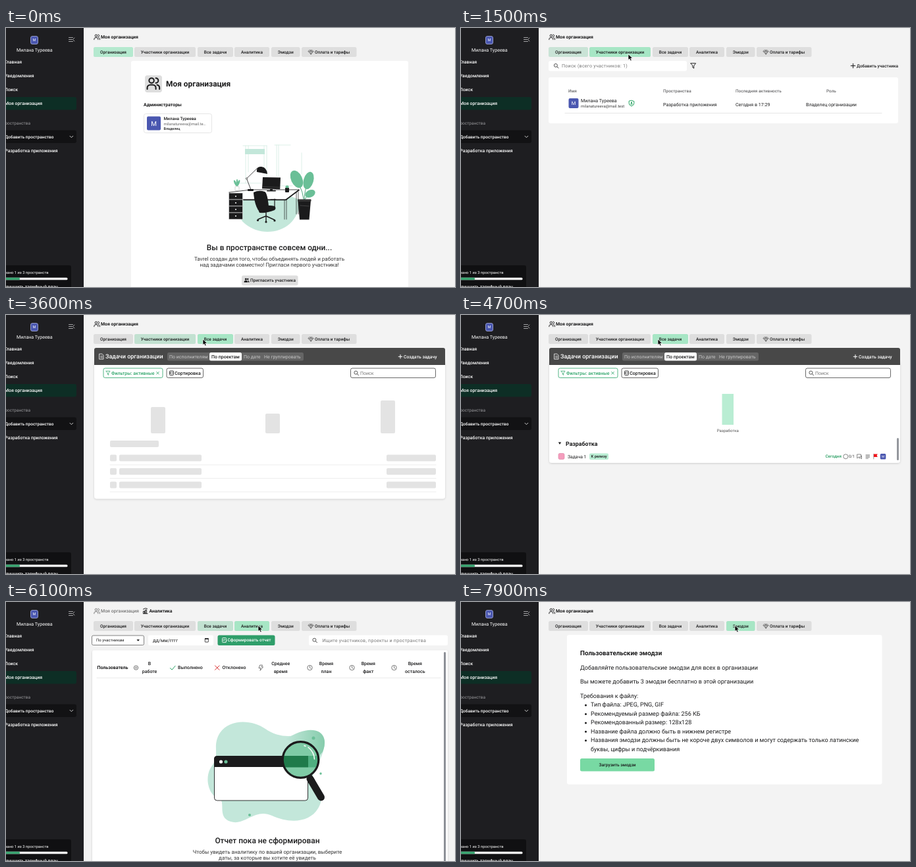
These frames come from a looping animation (682 by 394 pixels, 8 s). An HTML page:

```html
<!DOCTYPE html>
<html lang="ru">
<head>
<meta charset="utf-8">
<title>Моя организация</title>
<style>
  html, body { margin: 0; width: 100%; height: 100%; overflow: hidden; background: #f3f3f3; }
  svg { display: block; width: 682px; height: 394px; font-family: Roboto, Arial, sans-serif; }
  text { text-rendering: geometricPrecision; }
</style>
</head>
<body>
<svg id="stage" viewBox="0 0 682 394"></svg>
<script>
const LOOP = 8000, STEP = 100;
const INK = '#1b1b1c', MINT = '#b5e9cf', PALE = '#c3e7da', LEAF = '#6abf97', BLUE = '#4a57b0';
const USER = 'Милана Туреева', MAIL = 'milanatureeva@mail.te';

// Drawing helpers: each returns SVG markup
const rect = (x, y, w, h, fill, r = 0, extra = '') =>
  `<rect x="${x}" y="${y}" width="${w}" height="${h}" rx="${r}" fill="${fill}" ${extra}/>`;
const box = (x, y, w, h, fill, r, line, lw = .8) =>
  rect(x, y, w, h, fill, r, `stroke="${line}" stroke-width="${lw}"`);
const path = (d, line = INK, lw = .9, fill = 'none') =>
  `<path d="${d}" stroke="${line}" stroke-width="${lw}" fill="${fill}" stroke-linecap="round" stroke-linejoin="round"/>`;
const shape = (d, fill) => `<path d="${d}" fill="${fill}"/>`;
const dot = (x, y, r, fill, line = 'none', lw = .8) =>
  `<circle cx="${x}" cy="${y}" r="${r}" fill="${fill}" stroke="${line}" stroke-width="${lw}"/>`;
const oval = (x, y, rx, ry, a, fill) =>
  `<ellipse rx="${rx}" ry="${ry}" fill="${fill}" transform="translate(${x} ${y}) rotate(${a})"/>`;
// y is the vertical middle of the capital letters
const text = (x, y, s, size, weight = 400, fill = INK, anchor = 'start', gap = 0) =>
  `<text x="${x}" y="${y + size * .355}" font-size="${size}" font-weight="${weight}" fill="${fill}" text-anchor="${anchor}" letter-spacing="${gap}">${s}</text>`;
const mid = (x, y, s, size, weight, fill) => text(x, y, s, size, weight, fill, 'middle');
const end = (x, y, s, size, weight, fill) => text(x, y, s, size, weight, fill, 'end');
const group = (id, body, extra = '') => `<g id="${id}" ${extra}>${body}</g>`;
const place = (x, y, k, body) => `<g transform="translate(${x} ${y}) scale(${k})">${body}</g>`;

// Icons
const people = (x, y, k, color = INK) => place(x, y, k,
  path('M13 7a4 4 0 1 1-8 0a4 4 0 1 1 8 0M2 21v-2a5 5 0 0 1 5-5h4a5 5 0 0 1 5 5v2M16 3a4 4 0 0 1 0 8M22 21v-2a5 5 0 0 0-4-5', color, 2.2));
const lens = (x, y, color = '#444') =>
  dot(x - .6, y - .6, 2.5, 'none', color, .9) + path(`M${x + 1.3} ${y + 1.3}l2.2 2.2`, color, 1);
const funnel = (x, y, k, color) => place(x, y, k, path('M-4-4h8l-3 4v4l-2-1.4V0z', color, 1));
const plus = (x, y, r, color) => path(`M${x - r} ${y}h${2 * r}M${x} ${y - r}v${2 * r}`, color, 1);
const clock = x => dot(x, 100, 3.7, 'none', '#444', .7) + path(`M${x} 97.7v2.4l1.6 1`, '#444', .7);
const avatar = (x, y, s, size, r = 2) => rect(x, y, s, s, BLUE, r) + mid(x + s / 2, y + s / 2, 'М', size, 400, '#fff');
const sheet = (x, y, color) =>
  path(`M${x - 3} ${y - 4}h4l2 2v6h-6zM${x - 1.4} ${y - .5}h2.8M${x - 1.4} ${y + 1.7}h2.8`, color, .8);

const tabs = [
  ['Организация', 133, 60], ['Участники организации', 195, 93], ['Все задачи', 291, 54],
  ['Аналитика', 347, 53], ['Эмодзи', 403, 43.5], ['Оплата и тарифы', 449, 83.5]
];

function sidebar() {
  const item = (x, y, s, size = 6.9) => end(x, y, s, size, 500, '#fff');
  return rect(0, 0, 118, 394, '#1e1e21') +
    box(37.5, 12.5, 11, 12, BLUE, 2.5, '#aab0dd', .8) + mid(43, 18.5, 'М', 5.5, 400, '#fff') +
    path('M95.5 14.5h6M95.5 17.5h5M95.5 20.5h6M104 15l-2.4 2.5l2.4 2.5', '#c4c4c6', .8) +
    mid(43.3, 33.3, USER, 7.1, 400, '#fff') +
    item(24, 51.8, 'Главная') + item(42.5, 72.8, 'Уведомления') + item(18, 93.8, 'Поиск') +
    rect(-5, 105, 112, 19.5, '#0d2e25', 3) + item(55, 114.5, 'Моя организация') +
    end(37, 144.8, 'Пространства', 6.5, 400, '#98989b') +
    rect(-5, 155.5, 112, 19.5, '#121214', 3) + item(72.5, 165.3, 'Добавить пространство', 6.5) +
    path('M97 164.3l2.4 2.4l2.4-2.4', '#ddd', .9) +
    item(78.5, 186.3, 'Разработка приложения') +
    rect(-5, 361, 104, 40, '#101012', 3) +
    end(64.5, 371.8, 'Использовано 1 из 3 пространств', 5.8, 400, '#fff') +
    rect(-5, 379.7, 98.5, 3.5, '#f4f4f4', 1.5) + rect(-5, 379.7, 26, 3.5, '#3aa672', 1.5) +
    item(79, 394, 'Улучшить тарифный план', 6.8);
}

function tabBar() {
  return tabs.map(([label, x, w], i) =>
    rect(x, 29, w, 15, '#dedede', 2.5) + rect(x, 29, w, 15, i ? '#a7e6c5' : MINT, 2.5, `id="tab${i}" opacity="0"`) +
    (i === 3 ? rect(x, 29, w, 15, '#cbcbcb', 2.5, 'id="hover" opacity="0"') : '') +
    (i < 5 ? mid(x + w / 2, 36.5, label, 6.5, 500) : text(469, 36.5, label, 6.5, 500))).join('') +
    path('M460.8 33.8h4.6l1.5 2l-3.8 4.2l-3.8-4.2zM459.3 35.8h7.6M463.1 40l-1.5-4.2l1.5-2l1.5 2z', '#444', .6);
}

function desk() {
  const drawers = [0, 1, 2, 3].map(i =>
    box(338.5, 251 + i * 10, 21, 10, INK, .5, '#eee', .6) + dot(349, 256 + i * 10, 1, '#fff')).join('');
  return shape('M350 262C344 289 370 310 397 310S444 293 448 262Q420 250 398 250T350 262Z', PALE) +
    path('M364 179v57M368 179v40M392 179v48M396 179v48M411 178v48M414 178v48M449 190v32M360 179h36M408 178h24M346 236h42M417 240h18', '#d3ece2', .8) +
    rect(363, 184, 30, 8, PALE) +
    path('M441 249v34M444 249v34', INK, .7) +
    path('M339 250L372 246H445L425 261H361Z', INK, .8, '#fff') + path('M445 246.5L425 261.5H361', INK, 1.6) +
    path('M423 262v29M426 261v30', INK, .7) + drawers +
    path('M372 246L365.5 229L382 213', INK, .8) + dot(365.5, 229, 1.2, '#fff', INK, .6) +
    shape('M381 219Q380 210 388 211Q396 212 397 222Z', INK) + shape('M383 220l11 2q-2 4-6 3q-4-1-5-5Z', '#fff') +
    rect(367, 245, 9, 3, INK, 1) +
    oval(348.5, 236, 1.5, 5, -25, LEAF) + oval(353, 236, 1.5, 5, 22, LEAF) + oval(351, 234, 1.2, 4, 0, LEAF) +
    box(348, 241, 6, 6.5, '#fff', 1, '#aaa', .5) +
    shape('M390 227l27 .6l-.8 17.6l-27.2-1Z', INK) + path('M390.5 241.5l25.5 .8', '#555', .5) +
    rect(401, 245, 4, 3, INK) + rect(396, 247, 14, 1.6, INK, .8) +
    rect(424, 243, 6, 7, INK, 1) + oval(427, 241.5, 2.6, 2, 0, LEAF) +
    shape('M376 250q8-4 17-1q4 2 6 22l-16 6q-6-10-7-27Z', INK) +
    shape('M382 274q14-6 26-3q3 3 0 6q-12 5-23 4Z', INK) + path('M408 260v12M402 261h8', INK, 1.2) +
    path('M395 279v8M395 286l-12 5M395 286l13 6M395 286v8', INK, 1.4) +
    dot(382.5, 292.5, 1.6, INK) + dot(395, 295, 1.6, INK) + dot(408, 293, 1.6, INK) +
    path('M453 264Q451 249 444 235M453 264Q453 247 459 232M453 264Q455 256 463 251', '#4fa47c', 1) +
    oval(441.5, 230, 8.5, 14, -25, LEAF) + oval(459.5, 232, 7.5, 13.5, 16, LEAF) + oval(462, 252, 5.5, 8, 65, LEAF) +
    shape('M443.5 262h19.5l-2.5 29.5h-14.5Z', INK) + rect(443, 260.5, 20.5, 3.5, '#333', 1) + path('M447 270l13 1', '#666', .5);
}

function home() {
  return rect(190, 50, 421, 350, '#fff', 3) +
    rect(211, 72, 26, 26, '#dedede', 4) + people(212.7, 73.4, .93) +
    text(243, 84.8, 'Моя организация', 11.9, 700) +
    text(209, 117, 'Администраторы', 6.95, 700) +
    box(209.5, 130.5, 103, 29, '#fff', 3, '#dfdfdf') + avatar(214, 134.5, 21, 10) +
    text(239.5, 137.5, USER, 6.4, 500) +
    text(239.5, 145.5, MAIL + '…', 5.9, 400, '#666') + text(239.5, 153.3, 'Владелец', 5.4, 500) +
    desk() +
    mid(400, 333.7, 'Вы в пространстве совсем одни...', 11.8, 500) +
    mid(400, 351, 'Tavrel создан для того, чтобы объединять людей и работать', 8.05, 400, '#333') +
    mid(400, 359.7, 'над задачами совместно! Пригласи первого участника!', 8.05, 400, '#333') +
    rect(358, 376.5, 85.5, 15, '#dedede', 2.5) +
    dot(364.3, 382, 1.5, INK) + dot(367.3, 382, 1.2, INK) +
    shape('M361.5 387q0-3 2.8-3t2.8 3ZM367.8 387q0-2-.8-3q2.5 0 2.5 3Z', INK) +
    text(371, 384, 'Пригласить участника', 6.5, 500);
}

function members() {
  const head = (x, s) => text(x, 95.6, s, 6.4, 500, '#6a6a6c');
  return rect(133, 50, 210, 15.5, '#fff', 3) + lens(144.5, 57.5) +
    text(153, 57.5, 'Поиск (всего участников: 1)', 7.1, 400, '#777', 'start', .24) +
    funnel(352.8, 57.5, .95, INK) + plus(595.5, 57.5, 3.3, INK) + text(601, 57.5, 'Добавить участника', 6.5, 500) +
    rect(133, 75, 531, 70, '#fff', 3) +
    head(163, 'Имя') + head(307, 'Пространства') + head(417, 'Последняя активность') + head(555, 'Роль') +
    avatar(163.5, 107, 15, 7.5) + text(182, 110.8, USER, 7.1) +
    text(182, 118.5, MAIL + 'st', 6, 400, '#444') +
    path('M259 110.3l3.8 1.2v3q0 2.8-3.8 4.4q-3.8-1.6-3.8-4.4v-3z', '#22a35f', 1) +
    dot(259, 113.4, 1.1, '#22a35f') + path('M259 114v2.3M257.5 115.7h3', '#22a35f', .8) +
    text(307, 116, 'Разработка приложения', 7.07) + text(417, 116, 'Сегодня в 17:29', 7.07) +
    text(524, 116, 'Владелец организации', 7.07) + path('M158 129.5h481', '#dcdcdc', .7);
}

function skeleton() {
  const gray = (x, y, w, h) => rect(x, y, w, h, '#e3e3e3', 2);
  const row = y => gray(158, y, 10, 10) + gray(172, y, 125, 10) + gray(578, y, 75, 10) +
    path(`M158 ${y + 15.5}h495`, '#e6e6e6', .7);
  return rect(134, 70, 533, 209.5, '#fff', 4, 'filter="url(#soft)"') +
    gray(220, 140, 22, 40) + gray(394, 150, 22, 30) + gray(569, 130, 22, 50) + gray(158, 191, 74, 10) +
    [212.5, 233, 253.5].map(row).join('');
}

function taskList() {
  return rect(134, 70, 533, 155, '#fff', 4, 'filter="url(#soft)"') +
    rect(396.5, 107, 17.5, 60, '#b9edd3', 0, 'id="bar"') + mid(405.3, 176, 'Разработка', 6.1, 400, '#555') +
    shape('M147.8 193.5h4.4l-2.2 3.6Z', INK) + text(159, 195.5, 'Разработка', 8.8, 700) +
    rect(662, 187, 3, 34, '#94979d', 1.5) +
    box(148, 210.5, 9, 9, '#f49dbd', 2, '#dc83a5', .6) + text(162, 215.2, 'Задача 1', 6.8) +
    rect(195, 210.5, 29, 9.5, '#b9edd3', 2) + mid(209.5, 215.2, 'К релизу', 5.8, 500) +
    text(553.5, 215.2, 'Сегодня', 6.3, 500, '#259c5f') + dot(584.3, 215.3, 3.5, '#fff', '#555', .7) +
    text(589, 215.2, '0/1', 6, 400, '#444') +
    path('M602 212h5.5v4h-3.5l-2 1.7zM604.5 217.5h2l2 1.2v-4.5M615 212.8h5.5M615 214.6h5.5M615 216.4h5.5M615 218.2h3.5', '#555', .7) +
    path('M626.8 211.5v7.5', '#777', .7) + shape('M627 211.5h5.8l-1.2 2.2l1.2 2.3H627Z', '#f0151c') +
    avatar(636.8, 211, 8.5, 4.8, 1.5);
}

function taskHead() {
  const mode = (x, s) => text(x, 63.1, s, 7, 400, '#c9c9c9');
  return shape('M134 76V53q0-3 3-3h527q3 0 3 3v23Z', '#484848') + sheet(145, 63.2, '#fff') +
    text(151, 63.1, 'Задачи организации', 9, 500, '#fff') +
    rect(245, 57, 207, 12.5, '#656565', 2.5) + rect(309, 57, 49, 12.5, '#fff', 2.5) +
    mode(248, 'По исполнителям') + text(312, 63.1, 'По проектам', 7, 500) + mode(361, 'По дате') + mode(392, 'Не группировать') +
    plus(599, 63.3, 2.8, '#fff') + text(604, 63.1, 'Создать задачу', 6.8, 500, '#fff') +
    box(148, 81, 90, 14.5, '#fff', 2.5, '#2aa367') + funnel(155, 88.3, .75, '#2aa367') +
    text(160, 88.2, 'Фильтры: активные', 6.95, 500, '#2aa367') + path('M228.7 86.5l3.6 3.6M232.3 86.5l-3.6 3.6', '#2aa367', .9) +
    box(244, 81, 55.5, 14.5, '#fff', 2.5, '#444') + box(248.5, 85, 6, 6.5, 'none', 1, INK, .8) +
    path('M250.2 86.5v3.5M252.8 86.5v3.5M248.5 88.2h1.7', INK, .7) + text(256.3, 88.2, 'Сортировка', 7, 500) +
    box(523.5, 81, 129, 14.5, '#fff', 2.5, '#444') + lens(532, 88.3) + text(538, 88.2, 'Поиск', 7, 400, '#777');
}

function magnifier() {
  return shape('M325 199C340 177 374 179 394 193S437 206 452 199S489 195 483 222S465 250 466 272S487 292 474 314S430 337 404 325S363 341 341 334S336 302 322 298S300 266 313 249S312 220 325 199Z', PALE) +
    shape('M424 209Q458 188 476 198Q489 208 481 228L466 244Q450 216 424 209Z', 'url(#fade)') +
    box(316.5, 235, 142, 67, '#fff', 4, INK, .9) + shape('M316 251v-12q0-5 5-5h133q5 0 5 5v12Z', INK) +
    dot(326.5, 243, 2.6, '#fff') + dot(334, 243, 2.6, LEAF) +
    path('M462 263l5 8', INK, 4) + path('M462 269l16.5 28', INK, 11) +
    dot(447.5, 240, 27, '#7fcba6') + shape('M421 234h38v17.5h-35.5Q420 242 421 234Z', '#1f7a4a') +
    shape('M459 234h15q1 9-3 17.5h-12Z', '#4fae80') +
    dot(447.5, 240, 27.3, 'none', INK, 3.2) + path('M459 221Q468 228 468.5 239M453 218.5l2 .7', '#fff', 1.5) +
    dot(467, 207, 2.5, LEAF) + dot(478, 261, 1.7, LEAF) + dot(370, 324, 2, LEAF);
}

function report() {
  const pair = (x, a, b) => mid(x, 93.8, a, 7, 500) + mid(x, 105.8, b, 7, 500);
  return box(130.5, 51, 79, 14.5, '#fff', 2, '#666', .8) + text(137, 58.1, 'По участникам', 6) +
    shape('M198.5 57h4.4l-2.2 2.8Z', INK) +
    rect(216, 50.5, 99, 15.5, '#fff', 2) + text(223, 58.1, 'дд/мм/гггг', 7.3) +
    box(302.3, 55.5, 5, 5.5, 'none', .5, INK, .8) + rect(302, 55, 5.6, 1.7, INK) +
    rect(321.5, 50.5, 87, 15.5, '#2f9e6a', 2.5) + box(328.5, 54.5, 6, 7, 'none', 1, '#fff', .8) +
    path('M330 57h3M330 59h1.5M333.5 60.5l1.8-1.8', '#fff', .8) + text(336.5, 58.1, 'Сформировать отчет', 6.6, 500, '#fff') +
    rect(460, 50.5, 211, 15.5, '#fff', 2.5) + lens(469, 58.3) +
    text(480.5, 58.1, 'Ищите участников, проекты и пространства', 7.1, 400, '#777', 'start', .25) +
    rect(131, 73.5, 540, 330, '#fff', 3, 'filter="url(#soft)"') + rect(665, 76, 3, 330, '#8d9097', 1.5) +
    text(138.5, 99.8, 'Пользователь', 7, 700) +
    dot(197.5, 100, 3.2, 'none', '#555', .8) + dot(197.5, 100, 1.2, 'none', '#555', .7) + pair(218, 'В', 'работе') +
    path('M249.5 100.5l2.6 2.7l5-6', '#2aa367', 1) + text(261, 99.8, 'Выполнено', 7, 500) +
    path('M317.5 96.8l6.5 6.5M324 96.8l-6.5 6.5', '#d82c2c', 1) + text(328.5, 99.8, 'Отклонено', 7, 500) +
    path('M386 96h3.5l-1.3 2.8h2.3l-4.5 5.5l.9-3.8h-2.5z', '#444', .7) + pair(417.3, 'Среднее', 'время') +
    [461.5, 525.5, 589.5].map(clock).join('') +
    pair(486.5, 'Время', 'план') + pair(550.3, 'Время', 'факт') + pair(621.3, 'Время', 'осталось') +
    path('M138 115.5h522', '#e2e2e2', .7) + magnifier() +
    mid(397, 363, 'Отчет пока не сформирован', 11.9, 500) +
    mid(397, 379.7, 'Чтобы увидеть аналитику по вашей организации, выберите', 8.05, 400, '#333') +
    mid(397, 388.7, 'даты, за которые вы хотите её увидеть', 8.05, 400, '#333');
}

function emoji() {
  const rules = ['Тип файла: JPEG, PNG, GIF', 'Рекомендуемый размер файла: 256 КБ', 'Рекомендованный размер: 128x128',
    'Название файла должно быть в нижнем регистре',
    'Названия эмодзи должны быть не короче двух символов и могут содержать только латинские',
    'буквы, цифры и подчёркивания'];
  return rect(161, 50, 478.5, 227.5, '#fff', 3) +
    text(181, 77.2, 'Пользовательские эмодзи', 9.8, 700) +
    text(181, 99.6, 'Добавляйте пользовательские эмодзи для всех в организации', 9.05) +
    text(181, 121, 'Вы можете добавить 3 эмодзи бесплатно в этой организации', 9.05) +
    text(181, 142.6, 'Требования к файлу:', 9.05) +
    rules.map((s, i) => text(197, 156.1 + 13.45 * i, s, 9.05) + (i < 5 ? dot(189.5, 157 + 13.45 * i, 1.5, INK) : '')).join('') +
    rect(181, 238, 113, 19.5, '#78d9a3', 2.5) + mid(237.5, 247.6, 'Загрузить эмодзи', 6.6, 500);
}

const crumb = people(133, 8.7, .43) + text(144, 14, 'Моя организация', 6.9, 700);
const reportCrumb = people(133, 8.7, .43, '#777') + text(144, 14, 'Моя организация', 7, 500, '#777') +
  path('M208.5 17.5v-3.5h2v3.5M211.5 17.5v-5.5h2v5.5M208.5 17.7h6.5M208.5 11l3-1.5l3 .8', INK, 1) +
  text(217.5, 14, 'Аналитика', 6.9, 700);
const arrow = path('M0 0v8.6l2-1.8l1.5 3.2l1.7-.8l-1.5-3.1h2.7z', '#fff', .7, '#000');
const hand = path('M-1 .6Q0-.6 1 .6V3.2L4 4Q5.2 4.4 5 6L4.3 8.5H-.4L-3.2 5.2Q-3 3.8-1 5z', '#222', .8, '#fff');

document.getElementById('stage').innerHTML =
  '<defs><filter id="soft" x="-5%" y="-10%" width="110%" height="120%"><feDropShadow dx="0" dy="1" stdDeviation="1.6" flood-opacity=".16"/></filter>' +
  `<linearGradient id="fade"><stop offset="0" stop-color="${PALE}"/><stop offset="1" stop-color="#86ccac"/></linearGradient></defs>` +
  rect(0, 0, 682, 394, '#f3f3f3') + sidebar() + group('crumb', crumb) + group('reportCrumb', reportCrumb) + tabBar() +
  group('page0', home()) + group('page1', members()) +
  group('page2', group('skeleton', skeleton()) + group('tasks', taskList()) + taskHead()) +
  group('page3', report()) + group('page4', emoji()) +
  group('cursor', group('arrow', arrow) + group('hand', hand));

const $ = id => document.getElementById(id);
const show = (id, on) => $(id).setAttribute('display', on ? 'inline' : 'none');
const clamp = v => Math.max(0, Math.min(1, v));

// Page opening times, and when the previous tab starts to fade
const opens = [0, 1500, 3500, 6000, 7800];
const fades = [0, 1400, 3500, 6000, 7650];
// Cursor track: time, x, y
const track = [[500, 272, 56], [700, 261, 46], [1000, 254, 40], [2500, 254, 40], [2700, 289, 37], [2900, 301, 37],
  [3100, 299, 37], [5000, 299, 37], [5300, 397, 31.5], [5500, 387, 35], [5700, 383, 36], [6800, 383, 36],
  [7000, 408, 36], [7200, 416, 36], [8000, 416, 36]];
const hands = [[2600, 3500], [5100, 6000], [6900, 7600]];

function cursorAt(t) {
  const i = track.findIndex(k => k[0] > t);
  const [t0, x0, y0] = track[i - 1], [t1, x1, y1] = track[i];
  const p = (t - t0) / (t1 - t0);
  return [x0 + (x1 - x0) * p, y0 + (y1 - y0) * p];
}

function draw(t) {
  const page = opens.filter(o => t >= o).length - 1;
  opens.forEach((_, i) => {
    show('page' + i, i === page);
    const old = page > 0 && i === page - 1 ? clamp(1 - (t - fades[page]) / 200) : 0;
    $('tab' + i).setAttribute('opacity', i === page ? 1 : old);
  });
  show('crumb', page !== 3);
  show('reportCrumb', page === 3);
  $('hover').setAttribute('opacity', t >= 5200 && t < 6000 ? 1 : 0);

  const loaded = t >= 4400;
  show('skeleton', !loaded);
  show('tasks', loaded);
  const h = 60 * (1 - (1 - clamp((t - 4300) / 1000)) ** 3);
  $('bar').setAttribute('y', 167 - h);
  $('bar').setAttribute('height', h);

  show('cursor', t >= 500);
  if (t >= 500) {
    const [x, y] = cursorAt(t);
    const pointing = hands.some(([a, b]) => t >= a && t < b);
    $('cursor').setAttribute('transform', `translate(${x} ${y})`);
    show('hand', pointing);
    show('arrow', !pointing);
  }
}

const start = performance.now();
function tick() {
  const t = (performance.now() - start) % LOOP;
  draw(Math.floor(t / STEP) * STEP);
  requestAnimationFrame(tick);
}
tick();
</script>
</body>
</html>
```
